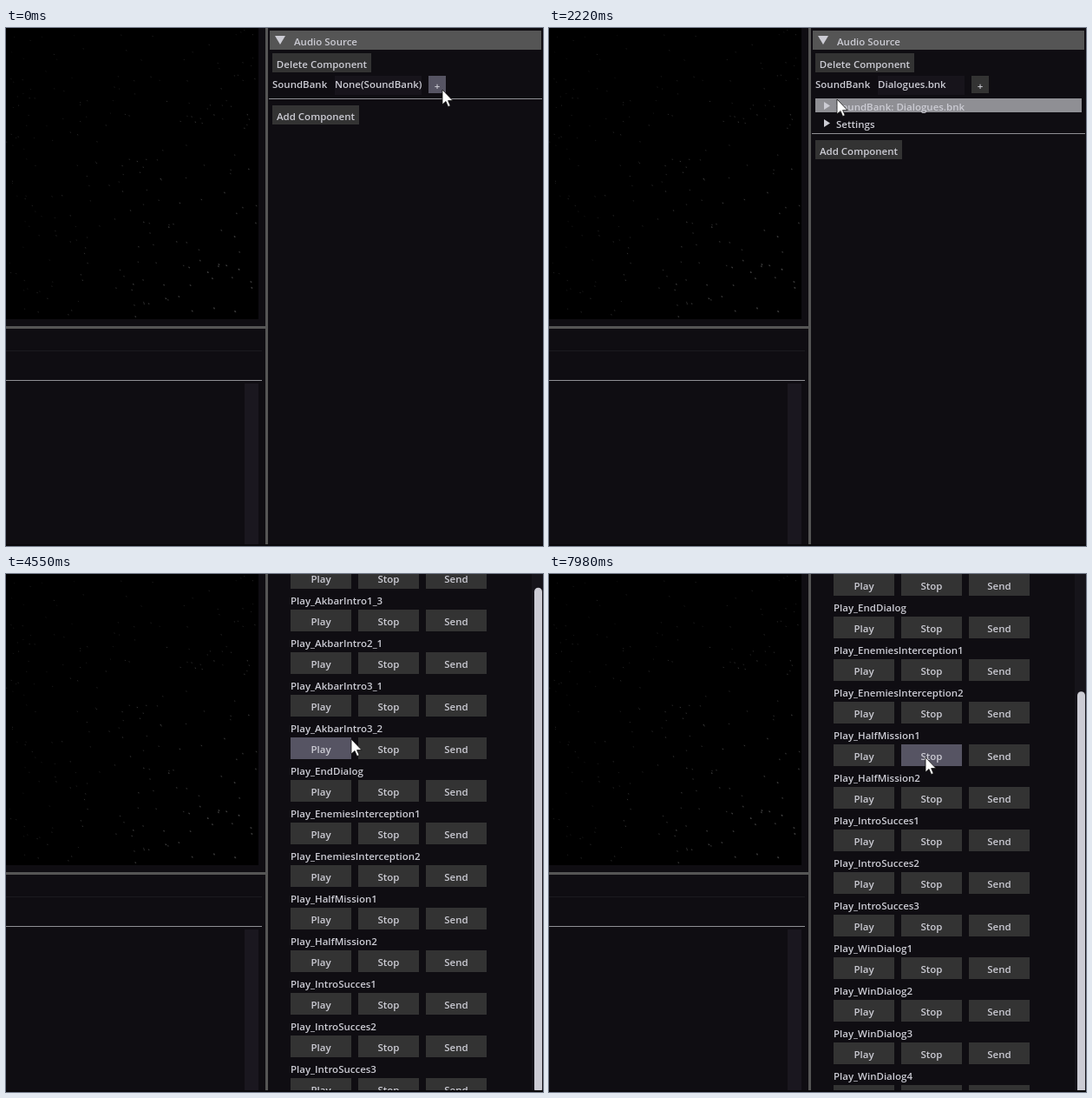
Animation, 619 px wide and 596 px high, one loop 8 s. Source, as an HTML page:

```html
<!DOCTYPE html>
<html lang="en">
<head>
<meta charset="utf-8">
<title>Audio component</title>
<style>
  html, body { margin: 0; width: 100%; height: 100%; overflow: hidden; background: #0f0d12; }
  svg { display: block; width: 619px; height: 596px; cursor: default; }
  rect { shape-rendering: crispEdges; }
  .round { shape-rendering: auto; }
  text {
    font: 600 11.5px "Open Sans", "Noto Sans", sans-serif;
    fill: #ccccd4; white-space: pre; user-select: none;
  }
  .mid { text-anchor: middle; }
  .cyan { fill: #00e3e3; }
</style>
</head>
<body>
<svg id="stage" viewBox="0 0 619 596"></svg>
<script>
const LOOP = 8000;
const INK = '#ccccd4', LINE = '#555', SOFT = '#8f8f94', BG = '#0f0d12', FIELD = '#1a171f';
const BUTTON = { base: '#333333', hover: '#565463', down: SOFT };
const ROW = { base: 'none', hover: SOFT, down: BG };

const stage = document.getElementById('stage');

function add(parent, tag, attrs, content) {
  const el = document.createElementNS('http://www.w3.org/2000/svg', tag);
  for (const key in attrs) el.setAttribute(key, attrs[key]);
  if (content !== undefined) el.textContent = content;
  return parent.appendChild(el);
}
const group = parent => add(parent, 'g', {});
const box = (parent, x, y, width, height, fill, more) =>
  add(parent, 'rect', { x, y, width, height, fill, ...more });
const label = (parent, x, y, str, cls = '') => add(parent, 'text', { x, y, class: cls }, str);
const shape = (parent, d, fill = INK, more) => add(parent, 'path', { d, fill, ...more });

// Interactive areas, tinted by the pointer each tick
const widgets = [];
function widget(parent, layer, x, y, w, h, look) {
  const el = box(parent, x, y, w, h, look.base);
  widgets.push({ el, layer, x, y, w, h, look });
}
function button(parent, layer, x, y, w, h, str) {
  widget(parent, layer, x, y, w, h, BUTTON);
  label(parent, x + w / 2, y + Math.floor(h / 2) + 6, str, 'mid');
}
function treeRow(parent, y, str) {
  widget(parent, 'closed', 307, y, 307, 16, ROW);
  shape(parent, `M317 ${y + 4}l7 4.5l-7 4.5z`);
  label(parent, 331, y + 14, str);
}

// Viewport with a seeded star field, and the lower left pane
const left = group(stage);
box(left, 0, 0, 619, 596, BG);
box(left, 0, 0, 291, 335, '#000');
let seed = 41;
const rnd = () => (seed = (seed * 16807) % 2147483647) / 2147483647;
for (let i = 0; i < 230; i++) {
  const x = rnd() * 288, y = rnd() * 332;
  const near = x * y / (288 * 332);
  const tone = Math.round(22 + rnd() * 28 + near * 30);
  const size = .9 + near;
  shape(left, `M${x} ${y}l${size} .4l.4 ${size}l${-size} -.3z`, `rgb(${tone},${tone},${tone})`);
}
box(left, 0, 343, 299, 3, LINE);
box(left, 0, 371, 295, 1, '#1b1a1f');
box(left, 0, 405, 295, 1, SOFT);
box(left, 275, 409, 16, 187, FIELD);
box(left, 299, 0, 3, 596, LINE);

// Inspector
const panel = group(stage);
const header = box(panel, 304, 3, 313, 22, LINE);
shape(panel, 'M310 9h12l-6 10z');
label(panel, 332, 20, 'Audio Source');
button(panel, 'panel', 307, 29, 114, 22, 'Delete Component');
label(panel, 307, 69, 'SoundBank');
box(panel, 379, 55, 100, 22, '#17141b');
const bank = label(panel, 379, 69, '');
button(panel, 'panel', 487, 55, 20, 20, '+');

function footer(parent, layer, y) {
  box(parent, 303, y, 315, 1, SOFT);
  button(parent, layer, 307, y + 8, 100, 22, 'Add Component');
}
const treeTitle = 'SoundBank: Dialogues.bnk';
const empty = group(panel);
footer(empty, 'empty', 81);

const closed = group(panel);
treeRow(closed, 81, treeTitle);
treeRow(closed, 101, 'Settings');
footer(closed, 'closed', 121);

const open = group(panel);
widget(open, 'open', 307, 81, 291, 16, ROW);
shape(open, 'M315 86h8l-4 7z');
label(open, 331, 95, treeTitle);
const events = ['Pause_Dialogues'];
const series = (name, ...tails) => tails.forEach(tail => events.push(`Play_${name}${tail}`));
series('AkbarAttack', '1_1', '1_2');
series('AkbarIntro', '1_1', '1_2', '1_3', '2_1', '3_1', '3_2');
series('EndDialog', '');
series('EnemiesInterception', 1, 2);
series('HalfMission', 1, 2);
series('IntroSucces', 1, 2, 3);
series('WinDialog', 1, 2, 3, 4);
events.forEach((name, i) => {
  const y = 115 + 49 * i;
  label(open, 328, y, name);
  ['Play', 'Stop', 'Send'].forEach((str, col) =>
    button(open, 'open', 328 + 78 * col, y + 6, 70, 25, str));
});

const bar = group(stage);
box(bar, 606, 0, 13, 596, '#16141a');
const grab = box(bar, 609, -191, 9, 581.5, INK, { rx: 4.5, class: 'round' });
box(stage, 0, 594, 619, 2, '#09080b');

// Resource picker
const popup = group(stage);
box(popup, 1.5, 6.5, 299, 398, BG, { rx: 6, stroke: INK, class: 'round' });
add(popup, 'circle', { cx: 290, cy: 16, r: 9, fill: FIELD });
label(popup, 5, 22, 'Resources');
box(popup, 2, 27, 298, 1, '#b4b4ba');
label(popup, 9, 49, 'Resource Filter:');
label(popup, 107, 49, '*case sensitive!', 'cyan');
box(popup, 9.5, 55.5, 255, 21, FIELD, { stroke: '#b4b4ba' });
label(popup, 269, 72, 'Fil');
const banks = ['None', 'Init', 'UI', 'Rebel_dialogue', 'Dialogues', 'Test', 'Music', 'Player'];
banks.forEach((name, i) => {
  const y = 83 + 20 * i;
  widget(popup, 'popup', 5, y, 292, 20, ROW);
  label(popup, 9, y + 16, i ? name + '.bnk' : name);
});

const pointer = shape(stage, 'M0 0V17L4 13.5L6.6 19.6L9.2 18.5L6.6 12.6H12z', '#fff',
  { stroke: '#111', 'stroke-width': .8 });

// Pointer moves: start time, end time, x and y reached
const home = [503, 71];
const moves = [
  [560, 1160, 62, 118], [1160, 1360, 52, 185], [1570, 1690, 53, 172],    // pick a bank
  [1960, 2220, 332, 82], [2250, 2340, 338, 88], [2700, 3040, 352, 140],  // open the tree
  [3290, 3540, 400, 183], [3980, 4150, 400, 187], [4400, 4780, 393, 195], // scroll
  [5420, 5900, 373, 255], [6240, 6480, 430, 252],                        // try the buttons
  [6700, 7190, 374, 212], [7630, 7980, 434, 211]
];
const presses = [380, 1850, 2550, 5990, 6560, 7360];
const HOLD = 100;
const PICK = presses[0] + HOLD, CHOSEN = presses[1] + HOLD, OPENED = presses[2] + HOLD;

const clamp = (v, lo, hi) => Math.min(hi, Math.max(lo, v));

function pointerAt(t) {
  let [x, y] = home;
  for (const [from, to, tx, ty] of moves) {
    const u = clamp((t - from) / (to - from), 0, 1), k = u * u * (3 - 2 * u);
    x += (tx - x) * k;
    y += (ty - y) * k;
  }
  return [x, y];
}

// Wheel notches turned so far in a burst
const burst = (t, start, gap, count) => clamp(Math.floor((t - start) / gap) + 1, 0, count);
function scrollAt(t) {
  const turns = burst(t, 3570, 193, 4) + burst(t, 4380, 210, 3) + burst(t, 5120, 200, 1);
  return Math.min(513, 65 * turns);
}
const show = (el, on) => el.setAttribute('display', on ? 'inline' : 'none');

function draw(t) {
  const [px, py] = pointerAt(t);
  const pick = t >= PICK && t < CHOSEN;
  const mode = t < CHOSEN ? 'empty' : t < OPENED ? 'closed' : 'open';
  const scroll = scrollAt(t);
  const down = presses.some(at => t >= at && t < at + HOLD);

  show(popup, pick);
  show(empty, mode === 'empty');
  show(closed, mode === 'closed');
  show(open, mode === 'open');
  show(bar, mode === 'open');
  header.setAttribute('width', mode === 'open' ? 297 : 313);
  bank.textContent = mode === 'empty' ? 'None(SoundBank)' : 'Dialogues.bnk';
  panel.setAttribute('transform', `translate(0 ${-scroll})`);
  grab.setAttribute('y', -191 + .636 * scroll);

  for (const { el, layer, x, y, w, h, look } of widgets) {
    const live = pick ? layer === 'popup' : layer === 'panel' || layer === mode;
    const top = layer === 'popup' ? y : y - scroll;
    const over = live && px >= x && px < x + w && py >= top && py < top + h;
    el.setAttribute('fill', over ? (down ? look.down : look.hover) : look.base);
  }
  pointer.setAttribute('transform', `translate(${Math.round(px)} ${Math.round(py)})`);
}

const start = performance.now();
function tick() {
  draw((performance.now() - start) % LOOP);
  requestAnimationFrame(tick);
}
tick();
</script>
</body>
</html>
```
